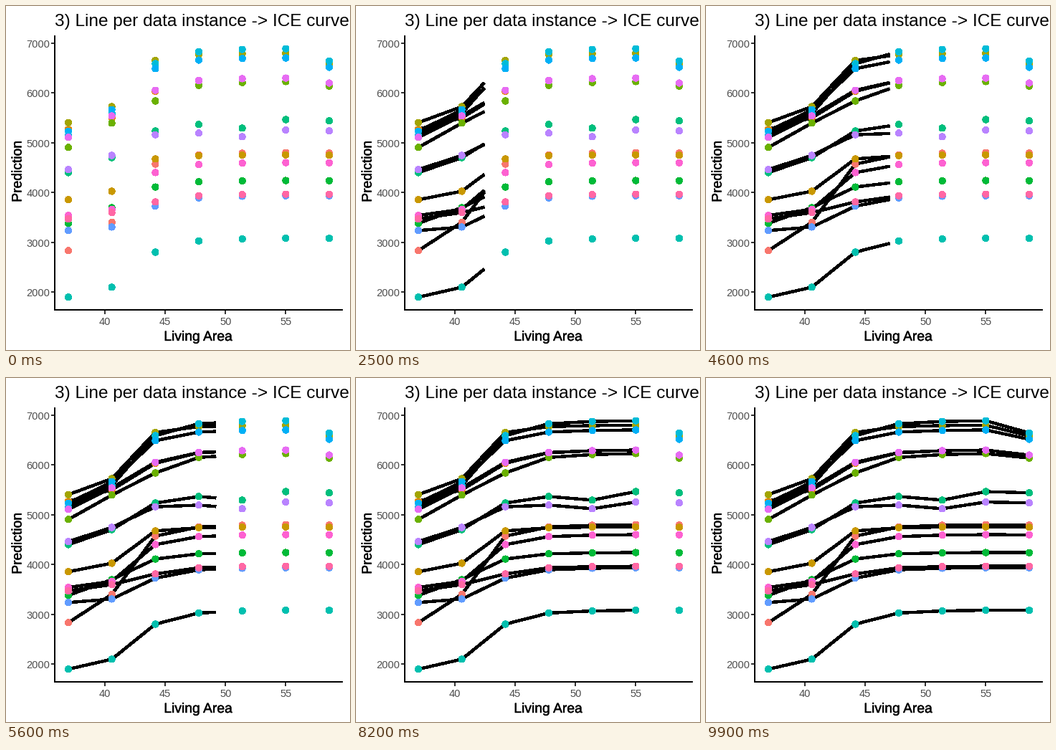
Recreate the animation shown at these times as a matplotlib script. Size 480 by 480 pixels, loop 10000 ms.

```python
import matplotlib.pyplot as plt
import numpy as np
from matplotlib.animation import FuncAnimation
from matplotlib.patheffects import Normal, Stroke

SIZE, DPI, FRAMES = 480, 80, 100
PT = 72 / DPI  # points per pixel

plt.rcParams.update({
    "font.family": "Liberation Sans",
    "lines.antialiased": False,
})

# Per instance: prediction at the first three areas, then the plateau.
KEYS = [
    (2830, 3400, 4570, 4800), (5270, 5500, 6035, 6300),
    (3855, 4025, 4675, 4755), (5405, 5725, 6655, 6800),
    (4905, 5395, 5840, 6230), (3380, 3695, 4110, 4240),
    (4400, 4700, 5235, 5465), (1895, 2095, 2800, 3080),
    (5150, 5590, 6590, 6890), (5230, 5665, 6490, 6705),
    (3235, 3305, 3725, 3935), (4460, 4745, 5160, 5255),
    (5110, 5540, 6055, 6300), (3540, 3660, 4400, 4600),
    (3470, 3595, 3810, 3965),
]


def curve(start, second, third, top):
    """Seven predictions: rise, ease onto the plateau, fall off at the end."""
    gap = top - third
    dip = 190 * np.exp(-((top - 5380) / 200) ** 2)
    drop = 200 * (top / 6750) ** 10
    return [start, second, third, top - 0.2 * gap - dip / 3,
            top - 0.05 * gap - dip, top, top - drop]


def hcl(hue, chroma=100, lum=65):
    """Polar CIE-LUV colour as clipped sRGB."""
    h = np.radians(hue)
    u = chroma * np.cos(h) / (13 * lum) + 0.1978
    v = chroma * np.sin(h) / (13 * lum) + 0.4683
    y = ((lum + 16) / 116) ** 3
    x, z = 9 * y * u / (4 * v), y * (12 - 3 * u - 20 * v) / (4 * v)
    rgb = np.clip([3.2405 * x - 1.5371 * y - 0.4985 * z,
                   -0.9693 * x + 1.8760 * y + 0.0416 * z,
                   0.0556 * x - 0.2040 * y + 1.0572 * z], 0, 1)
    return np.clip(np.where(rgb > 0.00304, 1.055 * rgb ** (1 / 2.4) - 0.055,
                            12.92 * rgb), 0, 1)


def px_x(area):
    return 138 + (area - 40) * 16.83


def px_y(pred):
    return 399 - (pred - 2000) * 0.0694


fig = plt.figure(figsize=(SIZE / DPI, SIZE / DPI), dpi=DPI, facecolor="white")
ax = fig.add_axes([0, 0, 1, 1])
ax.set(xlim=(0, SIZE), ylim=(SIZE, 0))
ax.axis("off")


def stroke(xs, ys, width, color="black", **kw):
    return ax.plot(xs, ys, color=color, lw=width * PT,
                   solid_capstyle="butt", **kw)[0]


def label(x, y, text, size, color="black", ha="center", **kw):
    return ax.text(x, y, text, fontsize=size * PT, color=color, ha=ha,
                   va="baseline", rotation_mode="anchor", **kw)


# Axes
stroke([68, 68], [41, 425], 2)
stroke([67, 470], [424, 424], 2)
for pred in range(2000, 7001, 1000):
    y = px_y(pred)
    stroke([63, 67], [y, y], 2, "#333333")
    label(61.5, y + 6, str(pred), 14.6, "#4D4D4D", ha="right")
for area in range(40, 56, 5):
    x = px_x(area)
    stroke([x, x], [425, 430], 2, "#333333")
    label(x, 445, str(area), 14.6, "#4D4D4D")
label(68, 28, "3) Line per data instance -> ICE curve", 24.4, ha="left")
heavier = [Stroke(linewidth=0.4, foreground="black"), Normal()]
label(268, 467, "Living Area", 19.3, path_effects=heavier)
label(21.5, 231, "Prediction", 19.3, rotation=90, path_effects=heavier)

# Curves and points
ys = px_y(np.array([curve(*key) for key in KEYS]))
n, cols = ys.shape
knots = np.linspace(87, 451, cols)
colors = [hcl(15 + 360 * k / n) for k in range(n)]
lines = [stroke([], [], 3.4, zorder=3, solid_joinstyle="round") for _ in ys]
ax.scatter(np.tile(knots, n), ys.ravel(), s=(9.2 * PT) ** 2,
           c=np.repeat(colors, cols, axis=0), linewidths=0,
           antialiased=False, zorder=4)


def update(i):
    """Reveal every curve from left to right at constant speed."""
    head = knots[0] + (knots[-1] - knots[0]) * i / (FRAMES - 1)
    xs = np.append(knots[knots < head], head)
    for line, row in zip(lines, ys):
        line.set_data(xs, np.interp(xs, knots, row))
    return lines


anim = FuncAnimation(fig, update, frames=FRAMES, interval=100,
                     init_func=lambda: update(0), repeat=True, repeat_delay=0)
plt.show()
```
